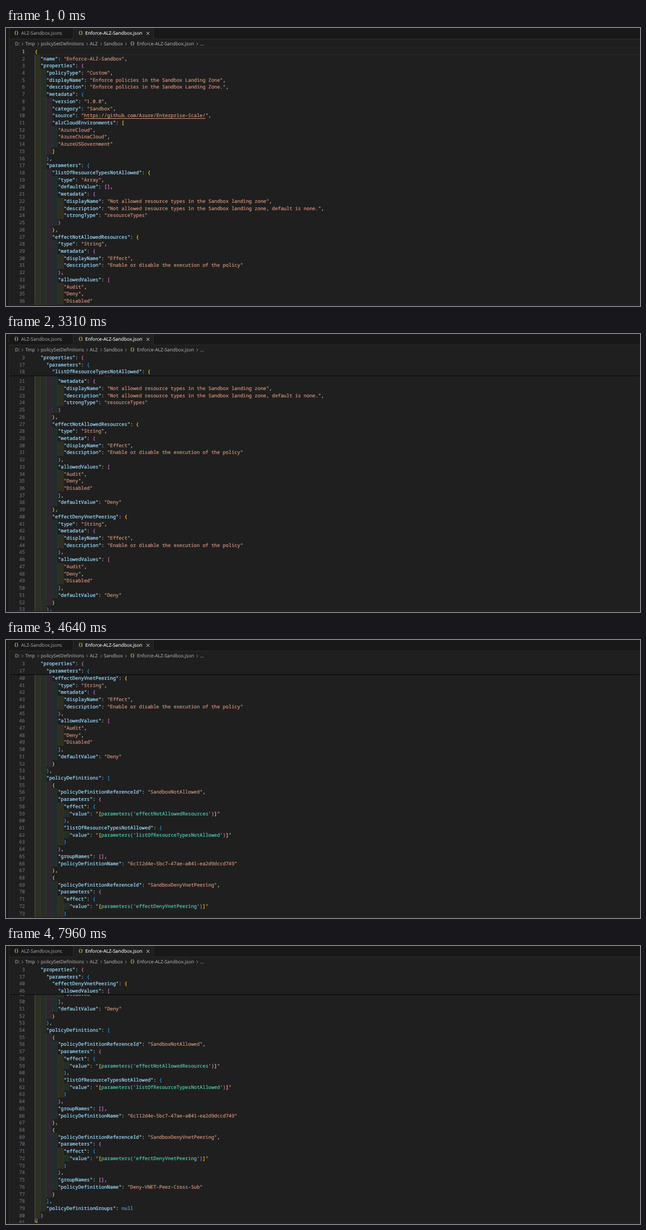
An HTML page that plays this animation: 1128 by 496 pixels, repeating every 8 s.

```html
<!DOCTYPE html>
<html lang="en">
<head>
<meta charset="utf-8">
<title>JSON editor scroll</title>
<style>
html, body { margin: 0; width: 100%; height: 100%; overflow: hidden; background: #1f1f1f; }
#stage { position: relative; width: 1128px; height: 496px; overflow: hidden; background: #1f1f1f; text-rendering: geometricPrecision; }
#stage div, #stage i, #stage svg { position: absolute; }
.ui { font: 8.35px/12px "Open Sans", "Noto Sans", sans-serif; white-space: pre; -webkit-text-stroke: .1px; }
.icon { font: bold 8.2px/12px "Noto Sans Mono", monospace; letter-spacing: -.9px; color: #dcb440; white-space: pre; }
#editor { left: 0; top: 35.4px; width: 1128px; height: 458.6px; overflow: hidden; }
#lines { left: 0; top: 0; width: 1128px; }
.row { left: 0; width: 1128px; height: 12.72px; font: 8.592px/12.72px "Noto Sans Mono", monospace; white-space: pre; color: #ccc; }
.num { left: 0; top: .4px; width: 33.7px; text-align: right; color: #6e7681; -webkit-text-stroke: .1px; }
.code { left: 51.2px; top: .4px; -webkit-text-stroke: .22px; }
.guide { width: 1px; background: #343434; }
.guide.on { background: #4c4c4c; }
.current { left: 50px; top: 0; width: 1078px; height: 12.72px; box-sizing: border-box; border: solid #282828; border-width: 1px 0; }
.match { left: 51px; width: 5.2px; height: 12.7px; box-sizing: border-box; border: 1px solid #777; background: rgba(0, 100, 0, .1); }
#caret { left: 51px; top: 0; width: 1.3px; height: 12.72px; background: #aeafad; }
#sticky { left: 5.5px; top: 0; width: 1122.5px; background: #1f1f1f; box-shadow: 0 2.2px 1.3px -1.3px rgba(0, 0, 0, .85); }
#clip { left: 0; top: 0; width: 100%; height: 100%; overflow: hidden; }
#clip .row { left: -5.5px; background: #1f1f1f; }
.key { color: #9cdcfe; } .str { color: #ce9178; } .lit { color: #569cd6; } .fn { color: #4ec9b0; }
.url { text-decoration: underline; text-underline-offset: 1.5px; text-decoration-thickness: 1px; }
.b0 { color: #ffd700; } .b1 { color: #da70d6; } .b2 { color: #179fff; }
</style>
</head>
<body>
<div id="stage">
  <div id="editor">
    <div id="lines"></div>
    <div id="sticky"><div id="clip"></div></div>
  </div>
  <div id="chrome"></div>
</div>
<script>
const source = `{
  "name": "Enforce-ALZ-Sandbox",
  "properties": {
    "policyType": "Custom",
    "displayName": "Enforce policies in the Sandbox Landing Zone",
    "description": "Enforce policies in the Sandbox Landing Zone.",
    "metadata": {
      "version": "1.0.0",
      "category": "Sandbox",
      "source": "https://github.com/Azure/Enterprise-Scale/",
      "alzCloudEnvironments": [
        "AzureCloud",
        "AzureChinaCloud",
        "AzureUSGovernment"
      ]
    },
    "parameters": {
      "listOfResourceTypesNotAllowed": {
        "type": "Array",
        "defaultValue": [],
        "metadata": {
          "displayName": "Not allowed resource types in the Sandbox landing zone",
          "description": "Not allowed resource types in the Sandbox landing zone, default is none.",
          "strongType": "resourceTypes"
        }
      },
      "effectNotAllowedResources": {
        "type": "String",
        "metadata": {
          "displayName": "Effect",
          "description": "Enable or disable the execution of the policy"
        },
        "allowedValues": [
          "Audit",
          "Deny",
          "Disabled"
        ],
        "defaultValue": "Deny"
      },
      "effectDenyVnetPeering": {
        "type": "String",
        "metadata": {
          "displayName": "Effect",
          "description": "Enable or disable the execution of the policy"
        },
        "allowedValues": [
          "Audit",
          "Deny",
          "Disabled"
        ],
        "defaultValue": "Deny"
      }
    },
    "policyDefinitions": [
      {
        "policyDefinitionReferenceId": "SandboxNotAllowed",
        "parameters": {
          "effect": {
            "value": "[parameters('effectNotAllowedResources')]"
          },
          "listOfResourceTypesNotAllowed": {
            "value": "[parameters('listOfResourceTypesNotAllowed')]"
          }
        },
        "groupNames": [],
        "policyDefinitionName": "6c112d4e-5bc7-47ae-a041-ea2d9dccd749"
      },
      {
        "policyDefinitionReferenceId": "SandboxDenyVnetPeering",
        "parameters": {
          "effect": {
            "value": "[parameters('effectDenyVnetPeering')]"
          }
        },
        "groupNames": [],
        "policyDefinitionName": "Deny-VNET-Peer-Cross-Sub"
      }
    ],
    "policyDefinitionGroups": null
  }
}
`.split("\n");

const LOOP = 8000, ROW = 12.72, TAB = 10.31;
const tints = ["255,255,64", "127,255,127", "255,127,255", "79,236,236"];

// [ms, scroll offset in px]
const scrolls = [
  [0, 0], [2430, 28.9], [2690, 47.3], [2760, 84], [2820, 102.3], [2890, 120.7],
  [3040, 139], [3105, 157.4], [3170, 175.7], [3240, 194.1], [3310, 212.4],
  [3370, 230.8], [3430, 249.2], [3570, 267.5], [3640, 304.1], [3710, 322.4],
  [3900, 340.8], [3970, 377.6], [4030, 396.2], [4500, 414.6], [4570, 451.4], [4640, 470.1],
  [4840, 488.5], [4905, 525.2], [4970, 543.7], [5230, 580.6], [5440, 599.3],
  [7370, 593], [7690, 589], [7820, 584.8], [7960, 566.4]
];
const carets = [[0, 0], [1260, 1], [1690, 0], [2230, 1]];
const matches = [[0, 0], [1300, 1]];

const $ = id => document.getElementById(id);
const at = (steps, t) => steps.filter(s => s[0] <= t).pop()[1];
const span = (cls, text) => `<span class="${cls}">${text}</span>`;

let depth = 0;
const open = c => span("b" + depth++ % 3, c);
const close = c => span("b" + --depth % 3, c);

function paint(text) {
  const token = /("[^"]*")(?=:)|"\[(\w+)\(('\w+')\)\]"|("[^"]*")|(null)|([{[])|([}\]])/g;
  return text.replace(token, (all, key, fn, arg, str, lit, left, right) => {
    if (key) return span("key", key);
    if (fn) return span("str", '"') + open("[") + span("fn", fn) + open("(") +
      span("fn", arg) + close(")") + close("]") + span("str", '"');
    if (str) return str.startsWith('"http')
      ? span("str", '"' + span("url", str.slice(1, -1)) + '"') : span("str", str);
    if (lit) return span("lit", lit);
    return left ? open(left) : close(right);
  });
}

const code = source.map(paint);
const indents = source.map(s => s.search(/\S|$/) / 2);

// Foldable blocks with a key can stick to the top.
const blocks = [];
source.forEach((s, i) => {
  if (!/": [{[]$/.test(s)) return;
  let end = i + 1;
  while (indents[end] > indents[i]) end++;
  blocks.push({ start: i, end });
});

const row = (i, y) =>
  `<div class="row" style="top:${y}px"><div class="num"${i ? "" : ' style="color:#ccc"'}>${i + 1}</div>` +
  `<div class="code">${code[i]}</div></div>`;

// One tinted column per run of lines indented past each level.
function columns() {
  let html = "";
  for (let k = 0; k < Math.max(...indents); k++) {
    for (let i = 0; i < indents.length; i++) {
      const from = i;
      while (indents[i] > k) i++;
      if (i === from) continue;
      const x = 51 + k * TAB;
      const span = `top:${from * ROW}px;height:${(i - from) * ROW}px`;
      html += `<i style="left:${x}px;width:${TAB}px;${span};background:rgba(${tints[k % 4]},.07)"></i>` +
        `<i class="guide${k ? "" : " on"}" style="left:${x - .4}px;${span}"></i>`;
    }
  }
  return html;
}

const match = i => `<div class="match" style="top:${i * ROW}px"></div>`;
$("lines").innerHTML = '<div class="current"></div>' + columns() + match(0) + match(80) +
  source.map((s, i) => row(i, i * ROW)).join("") + '<div id="caret"></div>';
const boxes = document.querySelectorAll(".match");

function drawSticky(y) {
  const rows = [];
  let height = 0;
  for (const { start, end } of blocks) {
    const slot = rows.length * ROW;
    const bottom = (end + 1) * ROW - y;
    if (slot <= start * ROW - y || slot > bottom) continue;
    const push = Math.min(0, bottom - slot - ROW);
    rows.push(row(start, slot + push));
    height = slot + ROW + push;
    if (push < 0) break;
  }
  $("clip").innerHTML = rows.reverse().join("");
  $("sticky").style.height = height + "px";
  $("sticky").style.display = height ? "block" : "none";
}

function drawChrome() {
  const rect = (x, y, w, h, c) => `<div style="left:${x}px;top:${y}px;width:${w}px;height:${h}px;background:${c}"></div>`;
  const label = (x, y, text, c = "#a9a9a9") => `<div class="ui" style="left:${x}px;top:${y}px;color:${c}">${text}</div>`;
  const icon = (x, y) => `<div class="icon" style="left:${x}px;top:${y}px">{}</div>`;
  const stroke = (x, y, d, c) => `<svg style="left:${x}px;top:${y}px" width="7" height="7" fill="none" stroke="${c}"><path d="${d}"/></svg>`;
  const line = "#2b2b2b", dark = "#181818";
  let html = rect(0, 0, 1128, 20, dark) + rect(0, 19, 1128, 1, line) +
    rect(120, 0, 142, 20, "#1f1f1f") + rect(119, 0, 1, 20, line) + rect(262, 0, 1, 20, line) +
    rect(0, 0, 5, 496, dark) + rect(5, 0, 1, 496, line) +
    rect(6, 494, 1122, 1, line) + rect(6, 495, 1122, 1, dark);
  html += icon(14, 3) + label(27, 3.5, "ALZ-Sandbox.jsonc", "#9d9d9d") +
    icon(128.5, 3) + label(141, 3.5, "Enforce-ALZ-Sandbox.json", "#fff") +
    stroke(248.5, 6, "M1 1L6 6M6 1L1 6", "#e0e0e0");
  const crumbs = [[16, "D:"], [34.5, "Tmp"], [62, "policySetDefinitions"], [149, "ALZ"],
    [174, "Sandbox"], [233, "Enforce-ALZ-Sandbox.json"], [345.5, "..."]];
  html += crumbs.map(([x, text]) => label(x, 22.5, text)).join("") + icon(220.5, 22);
  html += [27, 54.5, 141.5, 167, 211, 338].map(x => stroke(x, 25, "M1 1L3.5 3.5L1 6", "#8a8a8a")).join("");
  $("chrome").innerHTML = html;
}

let shown = null;
function draw(t) {
  const y = at(scrolls, t);
  if (y !== shown) {
    shown = y;
    $("lines").style.transform = `translateY(${-y}px)`;
    drawSticky(y);
  }
  $("caret").style.opacity = at(carets, t);
  boxes.forEach(b => b.style.opacity = at(matches, t));
}

drawChrome();
draw(0);
const began = performance.now();
function tick() {
  draw((performance.now() - began) % LOOP);
  requestAnimationFrame(tick);
}
requestAnimationFrame(tick);
</script>
</body>
</html>
```
